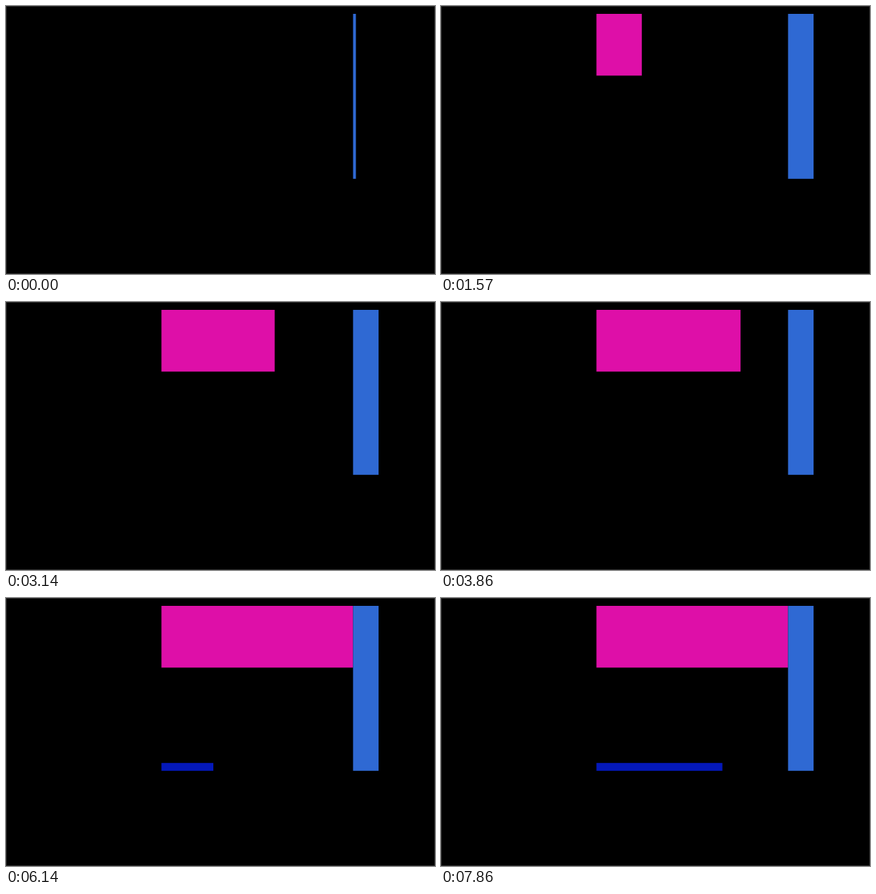
These frames come from a looping animation (600 by 375 pixels, 8 s). An HTML page:

```html
<!DOCTYPE html>
<html lang="en">
<head>
<meta charset="utf-8">
<title>Growing bars</title>
<style>
  /* Number of the current step; all bars share one pen moving at constant speed. */
  @property --step { syntax: "<number>"; inherits: true; initial-value: 0; }
  @keyframes draw { from { --step: 0; } to { --step: 56; } }

  html, body { margin: 0; width: 100%; height: 100%; overflow: hidden; background: #000; }
  svg {
    display: block;
    width: 600px;
    height: 375px;
    --drawn: calc(4px + var(--step) * 8.63px);
    animation: draw 8s steps(56) -3ms infinite;
  }
  .frame { fill: none; stroke: #2e2e2e; }
  .side { fill: #2f69d3; width: min(var(--drawn), 35.7px); }
  .top { fill: #de0fa8; width: clamp(0px, var(--drawn) - 35.5px, 268px); }
  .base { fill: #0418b9; width: max(0px, var(--drawn) - 302.5px); }
</style>
</head>
<body>
<svg viewBox="0 0 600 375">
  <rect class="frame" x=".5" y=".5" width="599" height="374"/>
  <rect class="top" x="217.4" y="11" height="86.4"/>
  <rect class="base" x="217.4" y="230.8" height="11"/>
  <rect class="side" x="485.4" y="11" height="230.8"/>
</svg>
</body>
</html>
```
